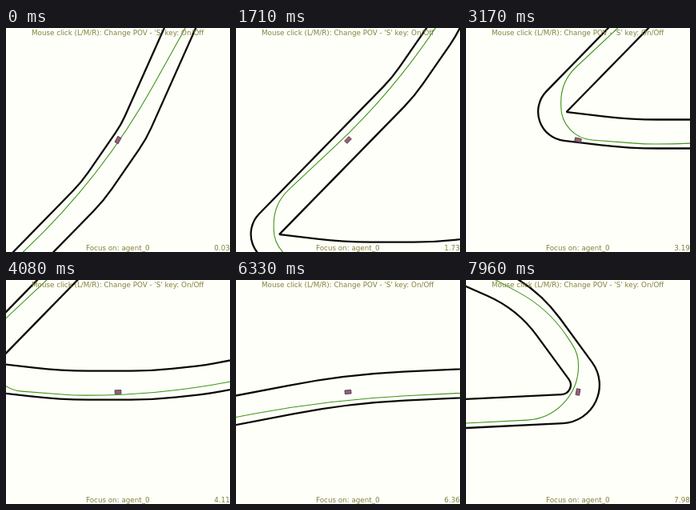
An HTML page for the animation above (8000 ms loop, 280x280 px).

```html
<!DOCTYPE html>
<html lang="en">
<head>
<meta charset="utf-8">
<title>Track follow view</title>
<style>
  html, body { margin: 0; width: 100%; height: 100%; overflow: hidden; background: #fffffa; }
  svg { display: block; width: 100vw; height: 100vh; }
  text { font: 8.75px "DejaVu Sans", sans-serif; fill: #80803c; }
  .wall, .line { fill: none; stroke-linejoin: round; }
  .wall { stroke: #0a0a05; stroke-width: 2.3; }
  .line { stroke: #3c9614; stroke-width: 1.1; }
</style>
</head>
<body>
<svg viewBox="0 0 280 280">
  <defs><path id="route"/></defs>
  <g id="world">
    <path id="left" class="wall"/>
    <path id="right" class="wall"/>
    <path id="racing" class="line"/>
  </g>
  <g id="car">
    <rect x="-3.9" y="-2.3" width="7.8" height="4.6" fill="#96607a" stroke="#54404a" stroke-width=".9"/>
  </g>
  <text x="32" y="8.6">Mouse click (L/M/R): Change POV - 'S' key: On/Off</text>
  <text x="100" y="278">Focus on: agent_0</text>
  <text id="clock" x="260.3" y="278"></text>
</svg>
<script>
const LOOP = 8000, FPS = 24, MID = 140, HALF_WIDTH = 18;
const $ = id => document.getElementById(id);

// Each line is a chain of corners: x, y, turning radius.
const ROAD = [
  [407, -255], [319.5, -59, 150], [268, 15.5, 200], [74.4, 213.6, 18.5], [193, 227.5, 600],
  [308, 227.5, 500], [377.5, 220, 300], [705.5, 157, 1000], [1030.5, 141.3, 30],
  [930.4, 4.7, 170], [808, -49.5]
];
const RACING = [
  [408, -232], [280, -1.4, 852], [106, 161.5, 60], [106, 232, 42], [210, 240, 300],
  [315.5, 240, 950], [682, 170.4, 1400], [995, 154.8, 68], [995, 75, 48],
  [957.4, 18.4, 170], [850, -39.6]
];
const ROUTE = [
  [300, -49], [262, 19, 100], [44, 236, 38], [285, 236, 500], [430, 218, 400],
  [690, 161.5, 400], [1000, 144, 28], [985, 60]
];

// Seconds and distance driven along the route.
const PACE = [[0, 0], [1.04, 73], [2.25, 250], [3.33, 397], [4.083, 512],
  [5.125, 708], [6.333, 960], [7.958, 1260]];

function unit(a, b) {
  const x = b[0] - a[0], y = b[1] - a[1], len = Math.hypot(x, y);
  return [x / len, y / len];
}

// Rounded chain, shifted sideways to the right of travel by `side`.
function chain(corners, side = 0) {
  const at = (p, d, along) =>
    [p[0] + d[0] * along - d[1] * side, p[1] + d[1] * along + d[0] * side];
  const last = corners.length - 1;
  let path = 'M' + at(corners[0], unit(corners[0], corners[1]), 0);
  for (let i = 1; i < last; i++) {
    const p = corners[i], u = unit(corners[i - 1], p), v = unit(p, corners[i + 1]);
    const turn = Math.atan2(u[0] * v[1] - u[1] * v[0], u[0] * v[0] + u[1] * v[1]);
    const cut = p[2] * Math.tan(Math.abs(turn) / 2);
    const r = p[2] - side * Math.sign(turn);
    path += `L${at(p, u, -cut)}A${r} ${r} 0 0 ${turn > 0 ? 1 : 0} ${at(p, v, cut)}`;
  }
  return path + 'L' + at(corners[last], unit(corners[last - 1], corners[last]), 0);
}

// Speed at a pace mark: standing start, then the average around the mark.
function speed(i) {
  if (i === 0) return 0;
  const a = PACE[i - 1], b = PACE[Math.min(i + 1, PACE.length - 1)];
  return (b[1] - a[1]) / (b[0] - a[0]);
}

function distance(t) {
  let i = 0;
  while (i < PACE.length - 2 && t >= PACE[i + 1][0]) i++;
  const [t0, s0] = PACE[i], [t1, s1] = PACE[i + 1], h = t1 - t0, u = (t - t0) / h;
  return s0 + (s1 - s0) * u * u * (3 - 2 * u) +
    h * u * (1 - u) * (speed(i) * (1 - u) - speed(i + 1) * u);
}

function draw(ms) {
  const t = Math.floor((ms + 5) / 1000 * FPS) / FPS;
  const s = distance(t), on = d => $('route').getPointAtLength(d);
  const p = on(s), back = on(s - 1), front = on(s + 1);
  const heading = Math.atan2(front.y - back.y, front.x - back.x) * 180 / Math.PI;
  $('world').setAttribute('transform', `translate(${MID - p.x} ${MID - p.y})`);
  $('car').setAttribute('transform', `translate(${MID} ${MID}) rotate(${heading})`);
  $('clock').textContent = (t + .026).toFixed(2);
}

$('left').setAttribute('d', chain(ROAD, -HALF_WIDTH));
$('right').setAttribute('d', chain(ROAD, HALF_WIDTH));
$('racing').setAttribute('d', chain(RACING));
$('route').setAttribute('d', chain(ROUTE));

const start = performance.now();
function tick() {
  draw((performance.now() - start) % LOOP);
  requestAnimationFrame(tick);
}
tick();
</script>
</body>
</html>
```
